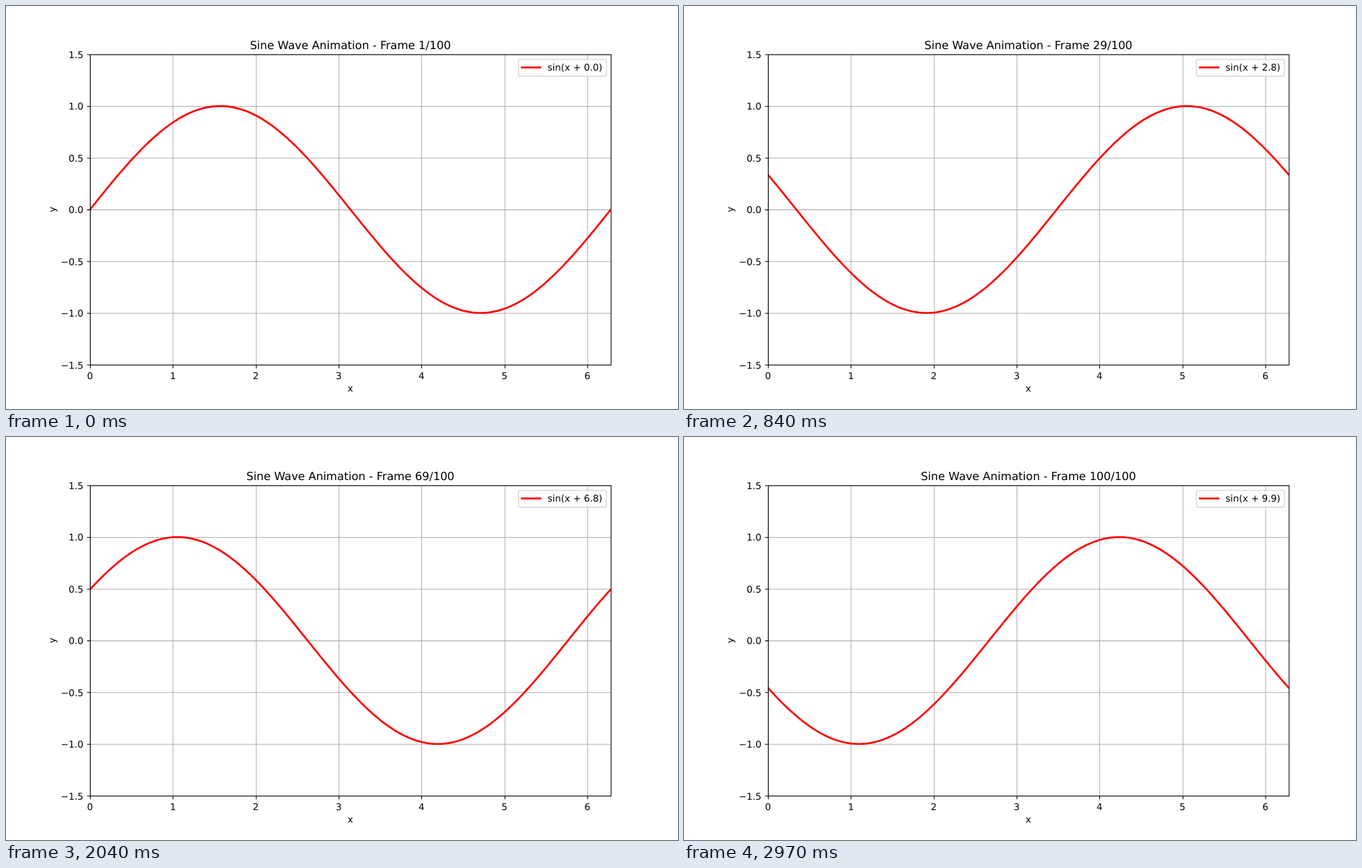
An HTML page for the animation above (3000 ms loop, 966 by 580 pixels).

```html
<!DOCTYPE html>
<html lang="en">
<head>
<meta charset="utf-8">
<title>Sine wave</title>
<style>
  html, body { margin: 0; width: 100%; height: 100%; overflow: hidden; background: #fff; }
  svg { display: block; width: 100vw; height: 100vh; }
  text { font: 13.89px "DejaVu Sans", sans-serif; text-rendering: geometricPrecision; white-space: pre; }
  #title { font-size: 16.67px; }
  .mid { text-anchor: middle; }
  .end { text-anchor: end; }
  path, line { fill: none; }
  #grid { stroke: #b0b0b0; stroke-width: 1.11; }
  #axes { stroke: #000; stroke-width: 1.11; }
  .wave { stroke: #f00; stroke-width: 2.78; stroke-linecap: square; stroke-linejoin: round; }
  #box { fill: #fff; stroke: #ccc; stroke-width: 1.39; opacity: .8; }
</style>
</head>
<body>
<svg viewBox="0 0 1000 600" preserveAspectRatio="none">
  <clipPath id="plot"><rect x="125" y="72" width="775" height="462"/></clipPath>
  <path id="grid"/>
  <path id="curve" class="wave" clip-path="url(#plot)"/>
  <path id="axes"/>
  <g id="labels"></g>
  <text id="title" class="mid" x="512.5" y="64"></text>
  <text class="mid" x="512.5" y="574">x</text>
  <text class="mid" transform="translate(73 303) rotate(-90)">y</text>
  <rect id="box" x="762.5" y="79.5" width="131" height="25" rx="2.8"/>
  <line class="wave" x1="767.6" x2="795.4" y1="91.5" y2="91.5"/>
  <text id="legend" x="806" y="96"></text>
</svg>
<script>
const LEFT = 125, RIGHT = 900, TOP = 72, BOTTOM = 534;
const STEP_MS = 30, STEPS = 100, SAMPLES = 200;
const $ = id => document.getElementById(id);
const px = x => LEFT + x * (RIGHT - LEFT) / (2 * Math.PI);
const py = y => TOP + (1.5 - y) * (BOTTOM - TOP) / 3;
const snap = v => Math.floor(v + 0.5) + 0.5;

function addLabel(cls, x, y, str) {
  const el = document.createElementNS("http://www.w3.org/2000/svg", "text");
  el.setAttribute("class", cls);
  el.setAttribute("x", x);
  el.setAttribute("y", y);
  el.textContent = str;
  $("labels").append(el);
}

function drawAxes() {
  const l = snap(LEFT), r = snap(RIGHT), t = snap(TOP), b = snap(BOTTOM);
  let grid = "", axes = `M${l} ${t}H${r}V${b}H${l}Z`;
  for (let i = 0; i <= 6; i++) {
    const x = snap(px(i)), value = i / 2 - 1.5, y = snap(py(value));
    grid += `M${x} ${t}V${b}M${l} ${y}H${r}`;
    axes += `M${x} ${b}v4.86M${l} ${y}h-4.86`;
    addLabel("mid", px(i), 555, i);
    addLabel("end", 115.3, py(value) + 5.5, value.toFixed(1).replace("-", "\u2212"));
  }
  $("grid").setAttribute("d", grid);
  $("axes").setAttribute("d", axes);
}

function drawWave(step) {
  const phase = step / 10, points = [];
  for (let i = 0; i <= SAMPLES; i++) {
    const x = 2 * Math.PI * i / SAMPLES;
    points.push(px(x).toFixed(2) + " " + py(Math.sin(x + phase)).toFixed(2));
  }
  $("curve").setAttribute("d", "M" + points.join("L"));
  $("title").textContent = `Sine Wave Animation - Frame ${step + 1}/${STEPS}`;
  $("legend").textContent = `sin(x + ${phase.toFixed(1)})`;
}

let shown = -1;
function tick() {
  const step = Math.floor(performance.now() / STEP_MS) % STEPS;
  if (step !== shown) drawWave(shown = step);
  requestAnimationFrame(tick);
}

drawAxes();
tick();
</script>
</body>
</html>
```
